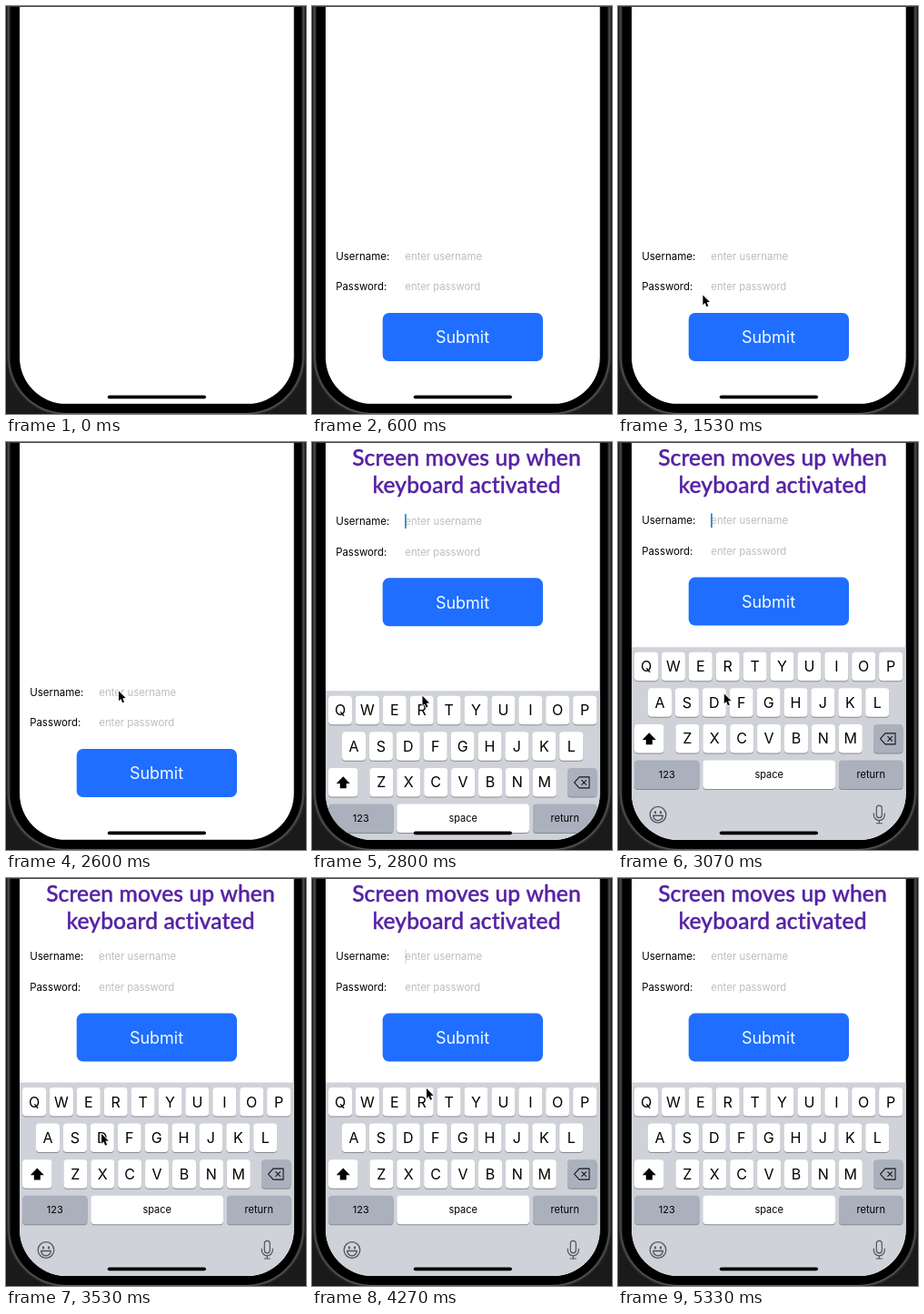
Animation of 330x448 px, one loop 5.4 s. Source, as an HTML page with a canvas:

```html
<!DOCTYPE html>
<html lang="en">
<head>
<meta charset="utf-8">
<title>Form above keyboard</title>
<style>
  html, body { margin: 0; width: 100%; height: 100%; overflow: hidden; background: #1a1a1a; }
  canvas { display: block; width: 330px; height: 448px; }
</style>
</head>
<body>
<canvas id="stage"></canvas>
<script>
const LOOP = 5400, W = 330, H = 448;
const canvas = document.getElementById('stage');
const ctx = canvas.getContext('2d');
const ratio = window.devicePixelRatio || 1;
canvas.width = W * ratio;
canvas.height = H * ratio;

const UI = 'Inter, "Liberation Sans", sans-serif';
const KEYBOARD_TOP = 224.5, SCREEN_BOTTOM = 436.8, FORM_SHIFT = 188.4;
const KEY_PITCH = 29.9, KEY_W = 26, KEY_H = 31.5;

const clamp = v => Math.max(0, Math.min(1, v));
const ramp = (t, start, length) => clamp((t - start) / length);

// Critically damped spring: share of the distance still to travel.
function remaining(t, start, rate) {
  const x = Math.max(0, t - start) * rate;
  return Math.exp(-x) * (1 + x);
}

function roundRect(x, y, w, h, r, fill) {
  ctx.beginPath();
  ctx.roundRect(x, y, w, h, r);
  ctx.fillStyle = fill;
  ctx.fill();
}

function text(str, x, y, size, color, align = 'left') {
  ctx.font = `400 ${size}px ${UI}`;
  ctx.textAlign = align;
  ctx.fillStyle = color;
  ctx.fillText(str, x, y);
}

function polygon(points) {
  ctx.beginPath();
  points.forEach(([x, y]) => ctx.lineTo(x, y));
  ctx.closePath();
}

function drawPhone() {
  ctx.fillStyle = '#1a1a1a';
  ctx.fillRect(0, 0, W, H);
  roundRect(1, -80, 328, 529.5, 64, '#303030');
  roundRect(2.5, -80, 325, 528, 63, '#606060');
  roundRect(3.5, -80, 323, 527, 62, '#1c1c1c');
  roundRect(5, -80, 320, 526.5, 61, '#000');
}

function clipScreen() {
  ctx.beginPath();
  ctx.roundRect(15, -80, 301.7, SCREEN_BOTTOM + 80, 51);
  ctx.clip();
  ctx.fillStyle = '#fff';
  ctx.fillRect(0, 0, W, H);
}

function caretAlpha(t) {
  if (t < 2665) return 0;
  if (t < 3110) return 1;
  const phase = (t - 3110) % 1030;
  return phase < 410 ? 1 - ramp(phase, 0, 160) : ramp(phase, 410, 160);
}

function drawForm(t) {
  const lift = FORM_SHIFT * (1 - remaining(t, 2630, 0.045));
  ctx.save();
  ctx.globalAlpha = ramp(t, 250, 340);
  ctx.translate(0, -lift);
  text('Username:', 26.2, 278.8, 11.5, '#000');
  text('Password:', 26.2, 312.2, 11.4, '#000');
  text('enter username', 102.3, 278.8, 11.4, '#bdbdbf');
  text('enter password', 102.3, 312.2, 11.3, '#bdbdbf');
  roundRect(77.7, 337, 176.3, 53, 7, '#1f6eff');
  text('Submit', 165.5, 370.4, 18, '#f2fbff', 'center');
  ctx.globalAlpha = caretAlpha(t);
  ctx.fillStyle = '#2590cc';
  ctx.fillRect(102, 266.8, 1.8, 15.8);
  ctx.restore();
}

function drawTitle(t) {
  ctx.save();
  ctx.globalAlpha = ramp(t, 2620, 120);
  ctx.font = '500 24.6px Lato, "Open Sans", sans-serif';
  ctx.letterSpacing = '0.1px'; // also turns ligatures off
  ctx.textAlign = 'center';
  ctx.fillStyle = ctx.strokeStyle = '#5522a3';
  ctx.lineWidth = 0.4;
  [['Screen moves up when', 26], ['keyboard activated', 56.2]].forEach(([line, y]) => {
    ctx.fillText(line, 170, y);
    ctx.strokeText(line, 170, y);
  });
  ctx.restore();
}

function key(x, y, w, fill = '#fff') {
  roundRect(x, y + 1, w, KEY_H, 4, '#898b91');
  roundRect(x, y, w, KEY_H, 4, fill);
}

function letterRow(letters, x, y) {
  [...letters].forEach((letter, i) => {
    const left = x + i * KEY_PITCH;
    key(left, y, KEY_W);
    text(letter, left + KEY_W / 2, y + 21.5, 16, '#000', 'center');
  });
}

function drawShift(x, y) {
  polygon([[x, y - 7], [x + 7.5, y + 0.8], [x + 3.5, y + 0.8], [x + 3.5, y + 6],
           [x - 3.5, y + 6], [x - 3.5, y + 0.8], [x - 7.5, y + 0.8]]);
  ctx.fillStyle = '#000';
  ctx.fill();
}

function drawDelete(x, y) {
  ctx.strokeStyle = '#15171a';
  ctx.lineWidth = 1.1;
  polygon([[x - 8.5, y], [x - 3, y - 6], [x + 8, y - 6], [x + 8, y + 6], [x - 3, y + 6]]);
  ctx.moveTo(x - 0.5, y - 2.7);
  ctx.lineTo(x + 4.9, y + 2.7);
  ctx.moveTo(x + 4.9, y - 2.7);
  ctx.lineTo(x - 0.5, y + 2.7);
  ctx.stroke();
}

function drawEmoji(x, y) {
  ctx.strokeStyle = ctx.fillStyle = '#50545b';
  ctx.lineWidth = 1.3;
  ctx.beginPath();
  ctx.arc(x, y, 8.8, 0, Math.PI * 2);
  ctx.stroke();
  for (const side of [-3, 3]) {
    ctx.beginPath();
    ctx.ellipse(x + side, y - 2.6, 1.1, 1.6, 0, 0, Math.PI * 2);
    ctx.fill();
  }
  ctx.beginPath();
  ctx.arc(x, y + 1, 5.3, 0, Math.PI);
  ctx.closePath();
  ctx.stroke();
}

function drawMic(x, y) {
  ctx.strokeStyle = '#50545b';
  ctx.lineWidth = 1.2;
  ctx.beginPath();
  ctx.roundRect(x - 3, y - 10, 6, 13.5, 3);
  ctx.moveTo(x - 6, y - 1.5);
  ctx.lineTo(x - 6, y + 0.5);
  ctx.arc(x, y + 0.5, 6, Math.PI, 0, true);
  ctx.lineTo(x + 6, y - 1.5);
  ctx.moveTo(x, y + 6.5);
  ctx.lineTo(x, y + 9.7);
  ctx.moveTo(x - 3.5, y + 9.7);
  ctx.lineTo(x + 3.5, y + 9.7);
  ctx.stroke();
}

function drawKeyboard(t) {
  if (t < 2650) return;
  const gray = '#abb0bd';
  ctx.save();
  ctx.translate(0, KEYBOARD_TOP + (SCREEN_BOTTOM - KEYBOARD_TOP) * remaining(t, 2650, 0.0186));
  ctx.fillStyle = '#cfd2d9';
  ctx.fillRect(0, 0, W, 230);
  letterRow('QWERTYUIOP', 18, 5.5);
  letterRow('ASDFGHJKL', 33, 45);
  letterRow('ZXCVBNM', 63.4, 84.7);
  key(18, 84.7, 32.5);
  drawShift(34.3, 101);
  key(281, 84.7, 32.5, gray);
  drawDelete(297, 100.6);
  const labels = [['123', 18, 71.5, gray], ['space', 93.3, 145.7, '#fff'], ['return', 243, 70.5, gray]];
  for (const [label, x, w, fill] of labels) {
    key(x, 124.2, w, fill);
    text(label, x + w / 2, 143.4, 11, '#000', 'center');
  }
  drawEmoji(44, 184);
  drawMic(287.3, 183.8);
  ctx.restore();
}

// Pointer stops: time, x, y.
const path = [
  [1180, -6, 450], [1400, 58, 362], [1600, 112, 294], [1730, 129, 271],
  [1900, 128, 270], [2070, 124, 273.5], [2620, 124, 273.5], [2800, 121.5, 278.8],
  [3070, 116.8, 276.5], [3400, 108, 280], [3670, 102, 282], [3800, 101, 282],
  [4000, 102, 281], [4130, 113, 258], [4270, 126, 231.5], [4400, 132, 180],
  [4530, 135, 131], [4670, 136, 78], [4770, 136, 43]
];

function drawPointer(t) {
  const i = path.findIndex(stop => stop[0] > t);
  if (i < 1) return;
  const [t0, x0, y0] = path[i - 1], [t1, x1, y1] = path[i];
  const p = (t - t0) / (t1 - t0);
  ctx.save();
  ctx.translate(x0 + (x1 - x0) * p, y0 + (y1 - y0) * p);
  polygon([[0, 0], [0, 10.8], [2.4, 8.6], [4.1, 12.7], [6, 11.9], [4.3, 7.9], [7.6, 7.6]]);
  ctx.lineJoin = 'round';
  ctx.lineWidth = 1.5;
  ctx.strokeStyle = '#fff';
  ctx.stroke();
  ctx.fillStyle = '#000';
  ctx.fill();
  ctx.restore();
}

function draw(t) {
  ctx.setTransform(ratio, 0, 0, ratio, 0, 0);
  drawPhone();
  ctx.save();
  clipScreen();
  drawForm(t);
  drawTitle(t);
  drawKeyboard(t);
  roundRect(111.8, 427.4, 108.2, 3.8, 1.9, '#000');
  ctx.restore();
  ctx.fillStyle = '#3c3c3c';
  ctx.fillRect(0, 0, W, 1);
  drawPointer(t);
}

const start = performance.now();
function tick() {
  draw((performance.now() - start) % LOOP);
  requestAnimationFrame(tick);
}
tick();
</script>
</body>
</html>
```
